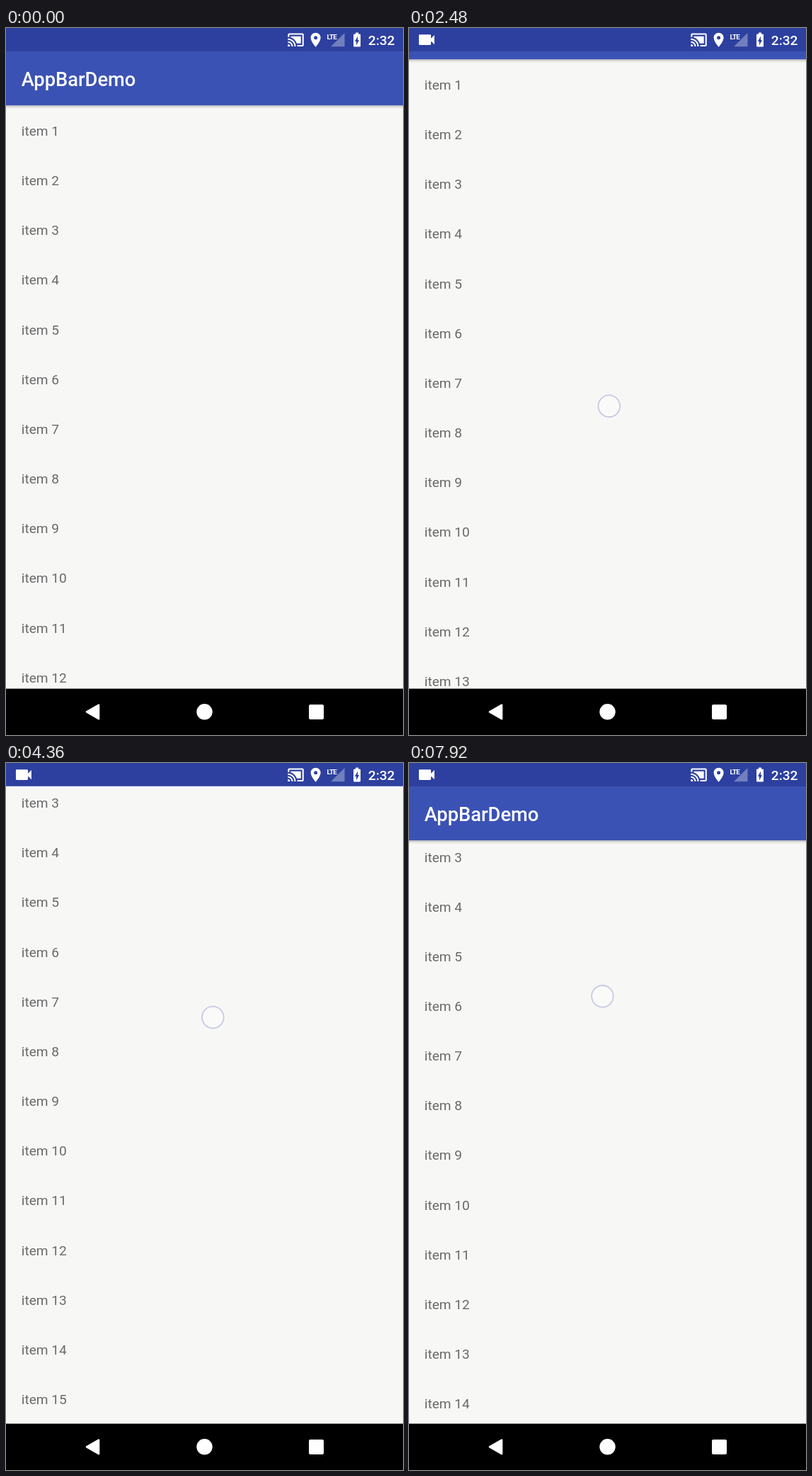
An HTML page for the animation above (8 s loop, 561 by 998 pixels).

```html
<!DOCTYPE html>
<html lang="en">
<head>
<meta charset="utf-8">
<title>AppBarDemo</title>
<style>
  html, body { margin: 0; width: 100%; height: 100%; overflow: hidden; background: #f7f7f6; }
  svg { display: block; width: 561px; height: 998px; font-family: Roboto, sans-serif; }
  #list { font-size: 19.1px; fill: #6a6a6a; }
  #bar rect { filter: drop-shadow(0 1.5px 2px rgba(0, 0, 0, .38)); }
  #bar text { font-size: 27.27px; font-weight: 500; fill: #fff; }
  .clock { font-size: 19.1px; font-weight: 500; }
  .lte { font-size: 9.8px; font-weight: 600; letter-spacing: -.9px; }
</style>
</head>
<body>
<svg viewBox="0 0 561 998">
  <rect width="561" height="998" fill="#f7f7f6"/>
  <g id="list"></g>
  <g id="bar">
    <rect x="-10" y="20" width="581" height="89.1" fill="#3b52b5"/>
    <text x="21.8" y="81.7">AppBarDemo</text>
  </g>
  <g id="status" fill="#fff">
    <rect width="561" height="32.8" fill="#2d409f"/>
    <path id="cam" transform="translate(10.3 2) scale(1.22)" d="M17 10.5V7c0-.55-.45-1-1-1H4c-.55 0-1 .45-1 1v10c0 .55.45 1 1 1h12c.55 0 1-.45 1-1v-3.5l4 4v-11z"/>
    <path transform="translate(397.3 4.5) scale(1.02)" d="M1 18v3h3c0-1.66-1.34-3-3-3zm0-4v2c2.76 0 5 2.24 5 5h2c0-3.87-3.13-7-7-7zm18-7H5v1.63c3.96 1.28 7.09 4.41 8.37 8.37H19zM1 10v2c4.97 0 9 4.03 9 9h2c0-6.08-4.93-11-11-11zm20-7H3c-1.1 0-2 .9-2 2v3h2V5h18v14h-7v2h7c1.1 0 2-.9 2-2V5c0-1.1-.9-2-2-2z"/>
    <path transform="translate(425.6 4.8)" d="M12 2C8.13 2 5 5.13 5 9c0 5.25 7 13 7 13s7-7.75 7-13c0-3.87-3.13-7-7-7zm0 9.5a2.5 2.5 0 0 1 0-5 2.5 2.5 0 0 1 0 5z"/>
    <path d="M478.5 7v19.3H459z" opacity=".33"/>
    <text class="lte" x="453.6" y="15.6">LTE</text>
    <path transform="translate(484 4.6)" d="M15.67 4H14V2h-4v2H8.33C7.6 4 7 4.6 7 5.33v15.33C7 21.4 7.6 22 8.33 22h7.33c.74 0 1.34-.6 1.34-1.33V5.33C17 4.6 16.4 4 15.67 4zM11 20v-5.5H9L13 7v5.5h2z"/>
    <text class="clock" x="511.8" y="24">2:32</text>
  </g>
  <g id="nav" fill="#fff">
    <rect y="932.6" width="561" height="66" fill="#000"/>
    <path d="M114 965.4L131 955.6V975.2z" stroke="#fff" stroke-width="2.6" stroke-linejoin="round"/>
    <circle cx="280.5" cy="965.3" r="11.2"/>
    <rect x="428" y="955" width="21" height="21" rx="2"/>
  </g>
  <circle id="touch" r="15.3" fill="#fff" fill-opacity=".35" stroke="#c6c9e6" stroke-width="1.8"/>
</svg>
<script>
const LOOP = 8000, STEP = 40, PITCH = 70.16, BAR = 76.4, LIST_MAX = 152.7;
const $ = id => document.getElementById(id);
const list = $('list'), bar = $('bar'), cam = $('cam'), touch = $('touch');

for (let i = 0; i < 15; i++) {
  const row = document.createElementNS('http://www.w3.org/2000/svg', 'text');
  row.setAttribute('x', 21.8);
  row.setAttribute('y', 151.9 + i * PITCH);
  row.textContent = `item ${i + 1}`;
  list.append(row);
}

// Downward drag in three short nudges after the main pull, as [time, distance].
const pull = [[5520, 0], [5720, 14], [6080, 54], [6240, 61.3], [6880, 61.3], [7200, 68.3],
  [7320, 68.3], [7520, 72.3], [7760, 72.3], [7920, BAR]];
// Upward drag: distance scrolled, then the finger position.
const scroll = [[920, 0], [1320, 17], [2480, 65], [3760, 140], [4360, BAR + LIST_MAX]];
const fingerY = [[900, 602], [1320, 584], [2480, 533.7], [3760, 448.3], [4360, 359], [5040, 252]];
const fingerX = [[900, 278], [1320, 279.3], [2480, 282.8], [3760, 286.6], [4240, 293], [5040, 277]];

// Monotone cubic through the keys.
function at(keys, t) {
  const n = keys.length - 1;
  if (t <= keys[0][0]) return keys[0][1];
  if (t >= keys[n][0]) return keys[n][1];
  const slope = i => (keys[i + 1][1] - keys[i][1]) / (keys[i + 1][0] - keys[i][0]);
  const tangent = i => {
    if (i === 0) return slope(0);
    if (i === n) return slope(n - 1);
    const a = slope(i - 1), b = slope(i);
    return a * b > 0 ? 2 * a * b / (a + b) : 0;
  };
  const i = keys.findIndex(k => k[0] > t) - 1;
  const [t0, v0] = keys[i], [t1, v1] = keys[i + 1];
  const h = t1 - t0, u = (t - t0) / h, w = 1 - u;
  return v0 * (1 + 2 * u) * w * w + v1 * u * u * (3 - 2 * u)
    + h * u * w * (tangent(i) * w - tangent(i + 1) * u);
}

const move = (el, x, y) => el.setAttribute('transform', `translate(${x} ${y})`);

function draw(time) {
  const t = Math.floor(time % LOOP / STEP) * STEP;
  const down = at(pull, t);
  const total = at(scroll, t) - down;
  // The bar leaves first on the way up and returns first on the way down.
  const hidden = t < 5400 ? Math.min(total, BAR) : BAR - down;

  move(list, 0, -total);
  move(bar, 0, -hidden);
  bar.style.visibility = hidden > BAR - .1 ? 'hidden' : 'visible';
  cam.style.opacity = Math.min(t / 240, 1);
  touch.style.visibility = t < 760 ? 'hidden' : 'visible';
  if (t < 5400) move(touch, at(fingerX, t), at(fingerY, t));
  else move(touch, 273.4, 254.8 + down * .975);
}

const start = performance.now();
function tick() {
  draw(performance.now() - start);
  requestAnimationFrame(tick);
}
tick();
</script>
</body>
</html>
```
